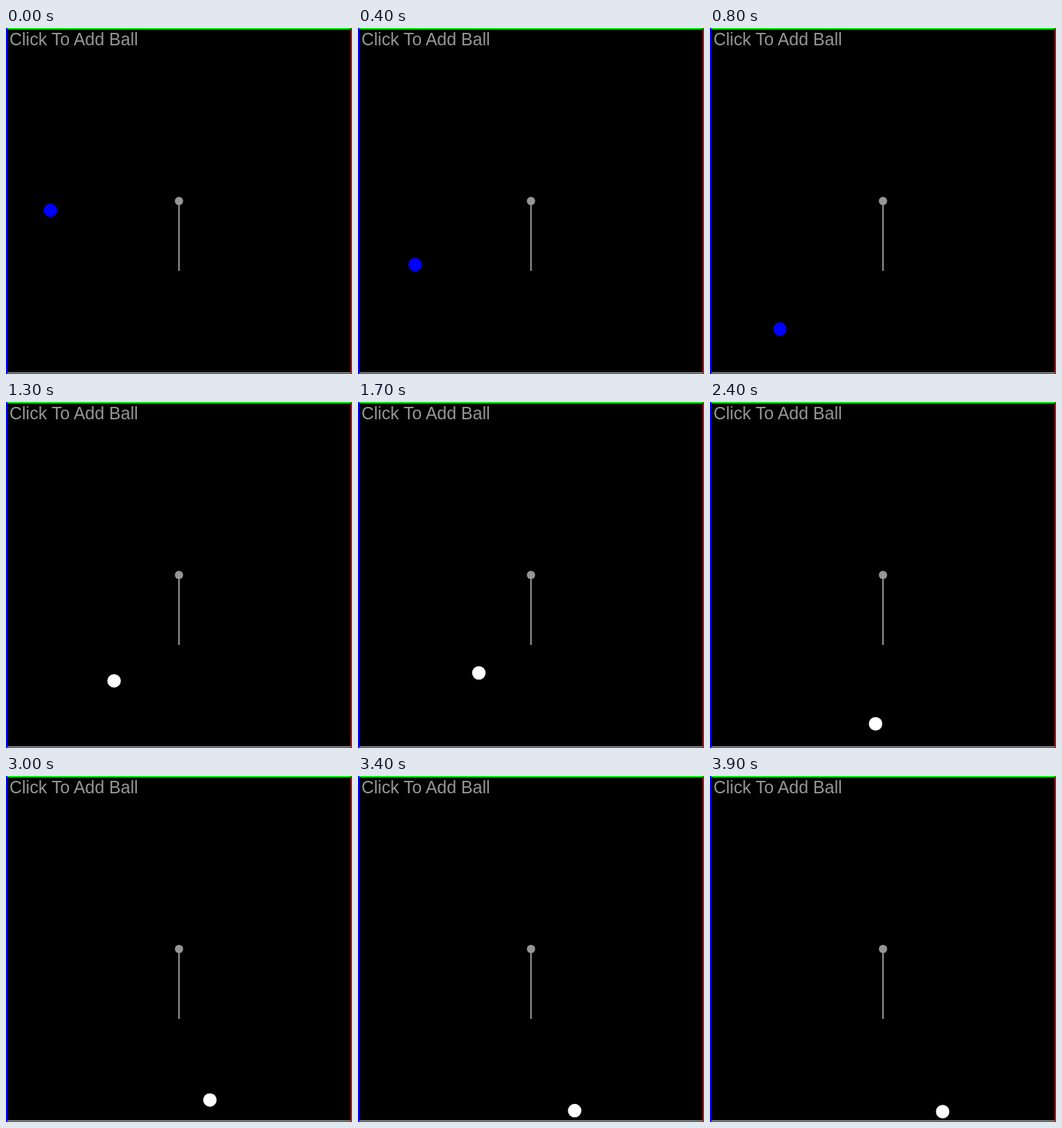
An HTML page for the animation above (4 s loop, 500 by 500 pixels).

```html
<!DOCTYPE html>
<html lang="en">
<head>
<meta charset="utf-8">
<title>Bouncing ball</title>
<style>
  html, body { margin: 0; width: 100%; height: 100%; overflow: hidden; background: #000; }
  svg { display: block; width: 100%; height: 100%; }
  text { font: 25px "Liberation Sans", Arial, sans-serif; }
</style>
</head>
<body>
<svg viewBox="0 0 500 500">
  <rect width="500" height="500" fill="#000"/>
  <g fill="#969696">
    <text x="5" y="25">Click To Add Ball</text>
    <rect x="249" y="250" width="2" height="101"/>
    <circle cx="250" cy="250" r="6"/>
  </g>
  <rect y="498" width="500" height="1" fill="#fff"/>
  <rect width="500" height="2" fill="#0f0"/>
  <rect x="498" width="2" height="500" fill="#f00"/>
  <rect width="2" height="500" fill="#00f"/>
  <circle id="ball" r="9.75"/>
</svg>
<script>
  const LOOP = 4000, TICK = 100;
  const GRAVITY = 0.9, SPEED = 4.615, START_X = 63.9;
  const ball = document.getElementById('ball');

  // Each arc: first step, height there, first vertical move
  const arcs = [
    { at: 0, y: 263.2, v: 18.3 },
    { at: 11, y: 481.2, v: -12.3 },
    { at: 40, y: 489.8, v: -6.2 },
    { at: 50, y: 468.2, v: 2.5 },
    { at: 55, y: 489.6, v: -2.5 }
  ];

  // The simulation runs ahead by several steps at each full second
  const stepAt = n => n + (n >= 10 ? 7 : 0) + (n >= 20 ? 7 : 0) + (n >= 30 ? 6 : 0);

  function heightAt(step) {
    const arc = arcs.filter(a => a.at <= step).pop();
    const k = step - arc.at;
    return arc.y + arc.v * k + GRAVITY * k * (k - 1) / 2;
  }

  function draw(ms) {
    const step = stepAt(Math.floor((ms % LOOP) / TICK));
    ball.setAttribute('cx', START_X + SPEED * step);
    ball.setAttribute('cy', heightAt(step));
    ball.setAttribute('fill', step < 11 ? '#00f' : '#fff');
  }

  let start;
  function loop(now) {
    if (start === undefined) start = now;
    draw(now - start);
    requestAnimationFrame(loop);
  }
  draw(0);
  requestAnimationFrame(loop);
</script>
</body>
</html>
```
